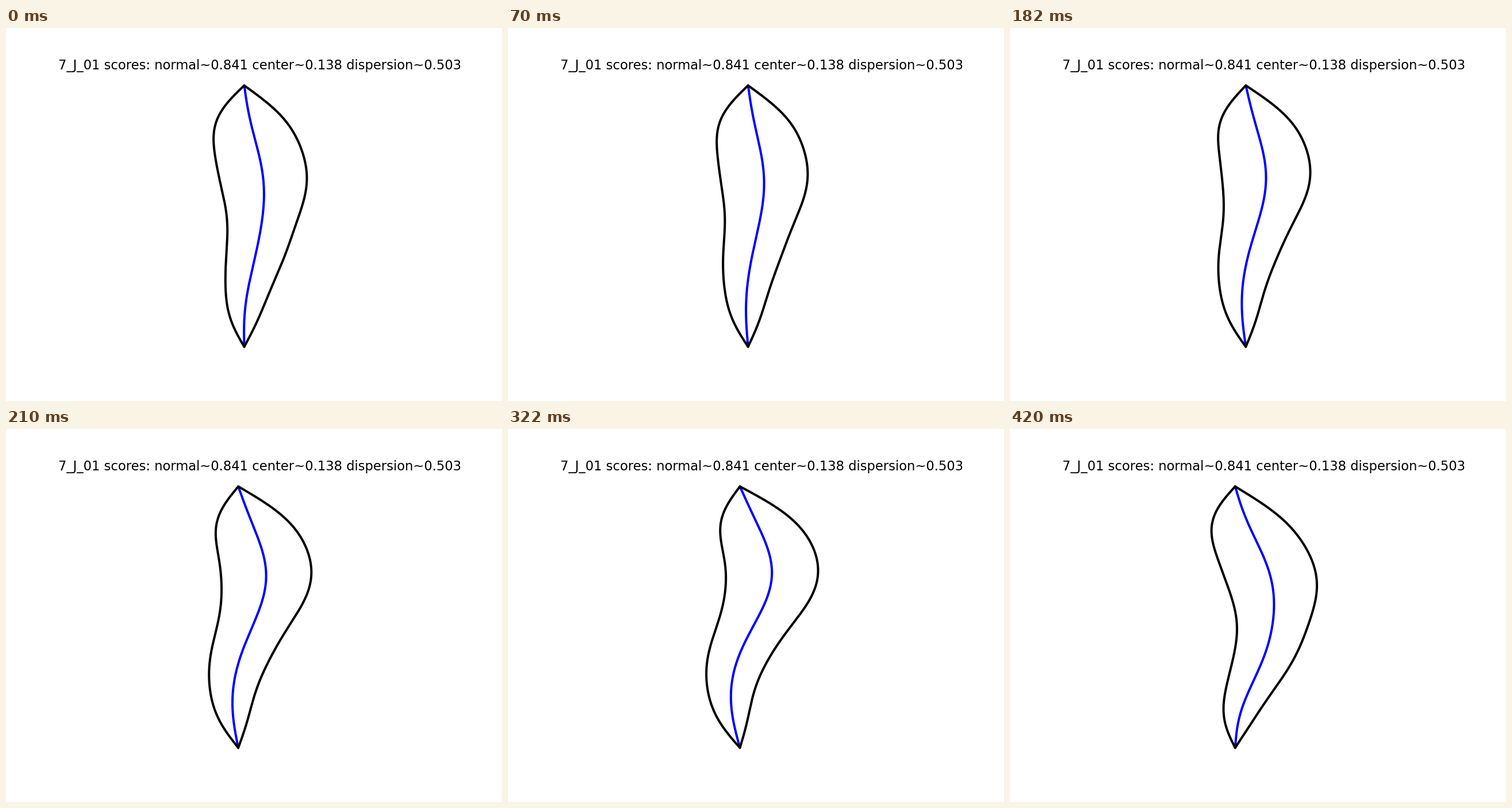
Recreate the animation shown at these times as a matplotlib script. Size 863 px wide and 649 px high, loop 490 ms.

```python
import numpy as np
import matplotlib.pyplot as plt
from matplotlib.animation import FuncAnimation

W, H, DPI = 863, 649, 64
PT = 72 / DPI  # points per pixel
TOP, BOTTOM = 100, 554.7
CENTER = 442.3
LEAN = 0.15  # how far the sides tilt with the midline

u = np.linspace(0, 1, 400)
y = TOP + (BOTTOM - TOP) * u


def waves(*amps):
    """Sum of standing sine waves, pinned at both tips."""
    return sum(a * np.sin(k * np.pi * u) for k, a in enumerate(amps, 1))


half = waves(72.8, 17.3, 12.1, 1.7, 2, 0.8, 1)

# strength of the C-shaped and the S-shaped bend in each pose
BENDS = [(27.7, 7.3), (18.4, 11), (20.9, 17), (28, 24.8),
         (28.5, 32), (66.5, 16.9), (60.2, 7.5)]


def body(c, s):
    """Midline and closed outline for a given bend."""
    mid = waves(c, s,
                0.05 * s - 0.095 * c - 2.8,
                0.03 * c - 0.09 * s - 0.9,
                -0.03 * c)
    slope = np.gradient(mid, y)
    stretch = np.sqrt(1 + slope ** 2).mean()
    w = half * stretch
    lift = LEAN * w * slope
    x = np.r_[mid - w, (mid + w)[::-1]]
    shift = CENTER - (x.min() + x.max()) / 2
    return mid + shift, x + shift, np.r_[y + lift, (y - lift)[::-1]]


fig = plt.figure(figsize=(W / DPI, H / DPI), dpi=DPI, facecolor="white")
ax = fig.add_axes([0, 0, 1, 1])
ax.set_xlim(0, W)
ax.set_ylim(H, 0)
ax.axis("off")

ax.text(441.7, 72, "7_J_01 scores: normal~0.841 center~0.138 dispersion~0.503",
        family="DejaVu Sans", size=22.6 * PT, color="black",
        ha="center", va="baseline")

style = dict(lw=4 * PT, solid_joinstyle="round", solid_capstyle="round")
midline, = ax.plot([], [], color="blue", **style)
outline, = ax.plot([], [], color="black", **style)


def draw(k):
    mid, x, side = body(*BENDS[k])
    midline.set_data(mid, y)
    outline.set_data(x, side)
    return midline, outline


anim = FuncAnimation(fig, draw, frames=len(BENDS), interval=70,
                     repeat=True, repeat_delay=0)
plt.show()
```
